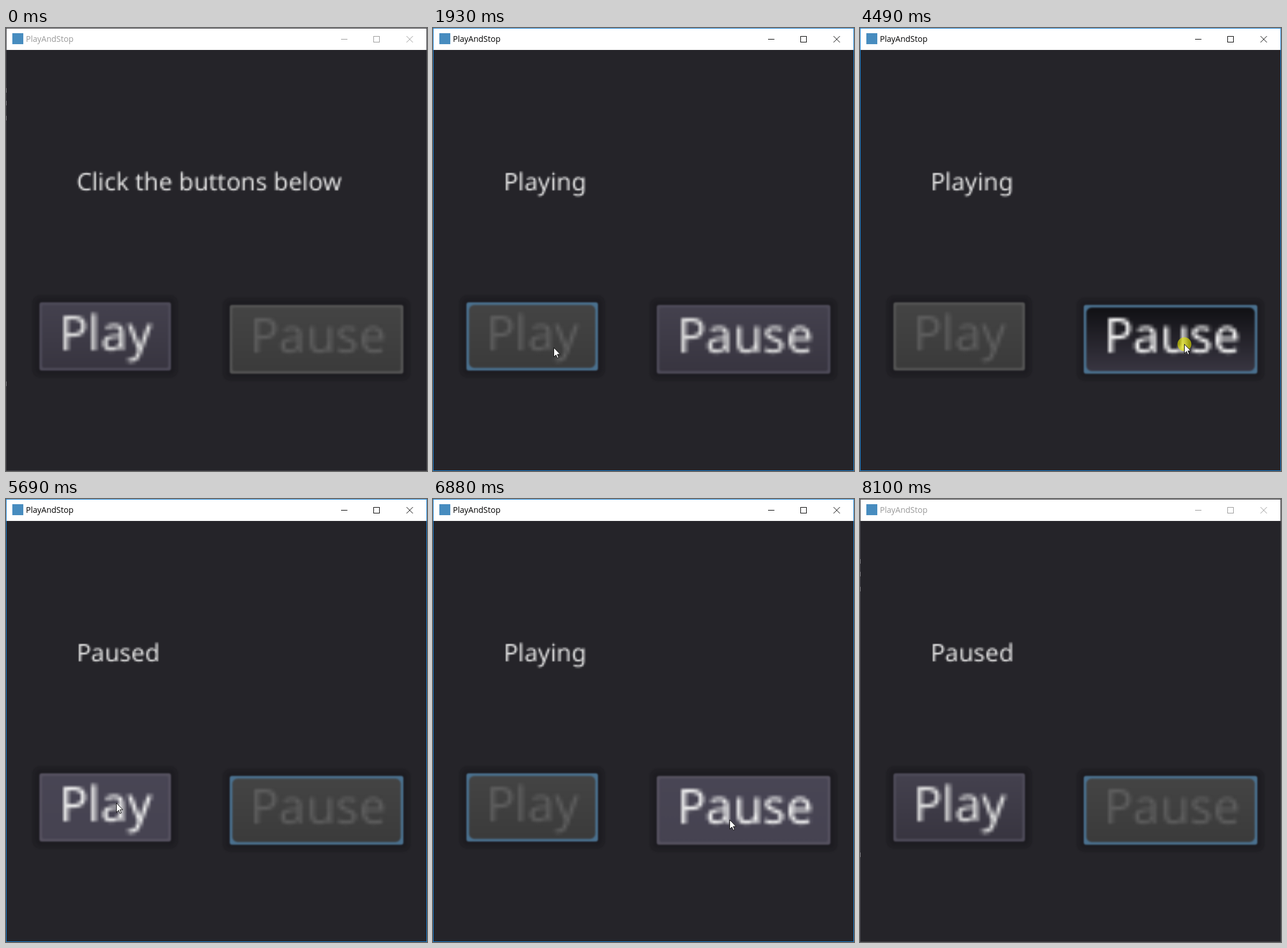
Write an HTML page with a canvas that moves like this. It is 730x767 px and loops after 8.16 s.

```html
<!DOCTYPE html>
<html lang="en">
<head>
<meta charset="utf-8">
<title>PlayAndStop</title>
<style>
  html, body { margin: 0; width: 730px; height: 767px; overflow: hidden; background: #252429; }
  canvas { display: block; }
</style>
</head>
<body>
<canvas id="stage" width="730" height="767"></canvas>
<script>
const ctx = document.getElementById('stage').getContext('2d');
const LOOP = 8160;
const ACTIVE = [1840, 8100];

// Pointer moves: first step, last step, number of steps, end x, end y
const MOVES = [
  [560, 560, 1, 533, 752],
  [630, 630, 1, 410, 698],
  [700, 700, 1, 340, 659],
  [1030, 1300, 5, 209, 553],
  [2600, 2930, 5, 229, 451],
  [3340, 3340, 1, 231, 452],
  [3380, 3710, 6, 562, 547],
  [5270, 5690, 7, 191, 526],
  [6450, 6880, 7, 514, 555],
  [7550, 7550, 1, 479, 722],
  [7630, 7630, 1, -50, -50]
];

// Clicks: highlight on, highlight off, button down, button released
const CLICKS = [
  [1770, 1840, 1840, 1930],
  [4490, 4580, 4490, 4650],
  [5920, 6010, 5920, 6080],
  [7200, 7270, 7200, 7340]
];

const BUTTONS = [
  { text: 'Play', x: 57, y: 474, w: 230, h: 120, tx: 91, base: 558 },
  { text: 'Pause', x: 387, y: 478.5, w: 303, h: 121, tx: 422, base: 562 }
];

// Style: fill top, fill bottom, border, text
const STYLES = {
  normal: ['#44414e', '#37343f', '#4d4a58', '#e2e2e2'],
  hover: ['#484554', '#454250', '#55515f', '#f2f2f2'],
  pressed: ['#0e0e11', '#3a3743', '#25242b', '#f8f8f8'],
  disabled: ['#444444', '#3a3a3a', '#535353', '#5e5e5e']
};

const within = (t, a, b) => t >= a && t < b;
const ease = p => p * p * (3 - 2 * p);

function pointerAt(t) {
  let x = -50, y = -50;
  for (const [from, to, n, ex, ey] of MOVES) {
    if (t < from) break;
    const gap = (to - from) / (n - 1) || 1;
    const p = ease(Math.min(n, Math.floor((t - from) / gap + 1e-6) + 1) / n);
    x += (ex - x) * p;
    y += (ey - y) * p;
  }
  return { x: Math.round(x), y: Math.round(y) };
}

// Small text enlarged with smoothing, like a scaled bitmap font
const sprites = {};
function pixelText(str, x, base, scale, color) {
  const key = str + color;
  if (!sprites[key]) {
    const c = sprites[key] = document.createElement('canvas');
    c.width = 170;
    c.height = 22;
    const g = c.getContext('2d');
    g.font = '14px "Noto Sans", sans-serif';
    g.textRendering = 'geometricPrecision';
    g.fillStyle = color;
    g.fillText(str, 0.63, 15);
  }
  ctx.imageSmoothingEnabled = true;
  ctx.drawImage(sprites[key], x - 0.63 * scale, base - 15 * scale, 170 * scale, 22 * scale);
}

function box(b, inset, radius, fill, blur) {
  ctx.filter = `blur(${blur}px)`;
  ctx.fillStyle = fill;
  ctx.beginPath();
  ctx.roundRect(b.x + inset, b.y + inset, b.w - 2 * inset, b.h - 2 * inset, radius);
  ctx.fill();
  ctx.filter = 'none';
}

function drawButton(b, mode, focus) {
  const [top, bottom, border, color] = STYLES[mode];
  const fill = ctx.createLinearGradient(0, b.y, 0, b.y + b.h);
  fill.addColorStop(0, top);
  fill.addColorStop(1, bottom);
  box(b, -12, 15, '#212025', 1);
  box(b, -6, 9, '#1d1c21', 2);
  box(b, 1, 4, focus ? '#4a708e' : border, 1);
  box(b, 5.5, focus ? 9 : 4, fill, 1.5);
  pixelText(b.text, b.tx, b.base, 6, color);
}

function drawWindow(active) {
  ctx.fillStyle = active ? '#1883d7' : '#434349';
  ctx.fillRect(0, 0, 730, 767);
  ctx.fillStyle = '#252429';
  ctx.fillRect(1, 38, 728, 728);
  ctx.fillStyle = '#fff';
  ctx.fillRect(1, 1, 728, 37);
  if (!active) {
    ctx.fillStyle = '#8a8a8e';
    for (const y of [104, 126, 152, 612]) ctx.fillRect(0, y, 1, 8);
  }

  ctx.fillStyle = '#478cbf';
  ctx.fillRect(11, 9, 19, 19);

  const ink = active ? '#000' : '#999';
  ctx.fillStyle = ctx.strokeStyle = ink;
  ctx.font = '14px "Open Sans", sans-serif';
  ctx.fillText('PlayAndStop', 34.5, 24);
  ctx.lineWidth = 1;
  ctx.fillRect(581, 19, 11, 1);
  ctx.strokeRect(637.5, 14.5, 10, 10);
  ctx.beginPath();
  ctx.moveTo(694.5, 14);
  ctx.lineTo(705.5, 25);
  ctx.moveTo(705.5, 14);
  ctx.lineTo(694.5, 25);
  ctx.stroke();
}

const arrow = new Path2D('M.5 .5V16.5L4.2 13L6.7 18.5L9 17.5L6.6 12H11.5Z');
function drawPointer({ x, y }, lit) {
  if (lit) {
    ctx.fillStyle = 'rgba(225,225,0,.65)';
    ctx.beginPath();
    ctx.arc(x + 0.5, y + 0.5, 12, 0, 7);
    ctx.fill();
  }
  ctx.save();
  ctx.translate(x, y);
  ctx.fillStyle = '#fff';
  ctx.strokeStyle = '#111';
  ctx.lineWidth = 1;
  ctx.fill(arrow);
  ctx.stroke(arrow);
  ctx.restore();
}

function draw(t) {
  const active = within(t, ...ACTIVE);
  const pointer = pointerAt(t);
  const pressed = CLICKS.some(c => within(t, c[2], c[3]));
  const lit = CLICKS.some(c => within(t, c[0], c[1]));
  const downs = CLICKS.filter(c => t >= c[2]).length;
  const done = CLICKS.filter(c => t >= c[3]).length;
  const enabled = done % 2;
  const focused = downs ? (downs - 1) % 2 : -1;

  drawWindow(active);
  const label = done ? ['Paused', 'Playing'][done % 2] : 'Click the buttons below';
  pixelText(label, 122, 281, 3, '#e2e2e2');

  BUTTONS.forEach((b, i) => {
    const over = active && within(pointer.x, b.x, b.x + b.w) && within(pointer.y, b.y, b.y + b.h);
    const mode = i !== enabled ? 'disabled' : pressed ? 'pressed' : over ? 'hover' : 'normal';
    drawButton(b, mode, i === focused);
  });
  drawPointer(pointer, lit);
}

const start = performance.now();
function tick() {
  draw((performance.now() - start) % LOOP);
  requestAnimationFrame(tick);
}
tick();
</script>
</body>
</html>
```
